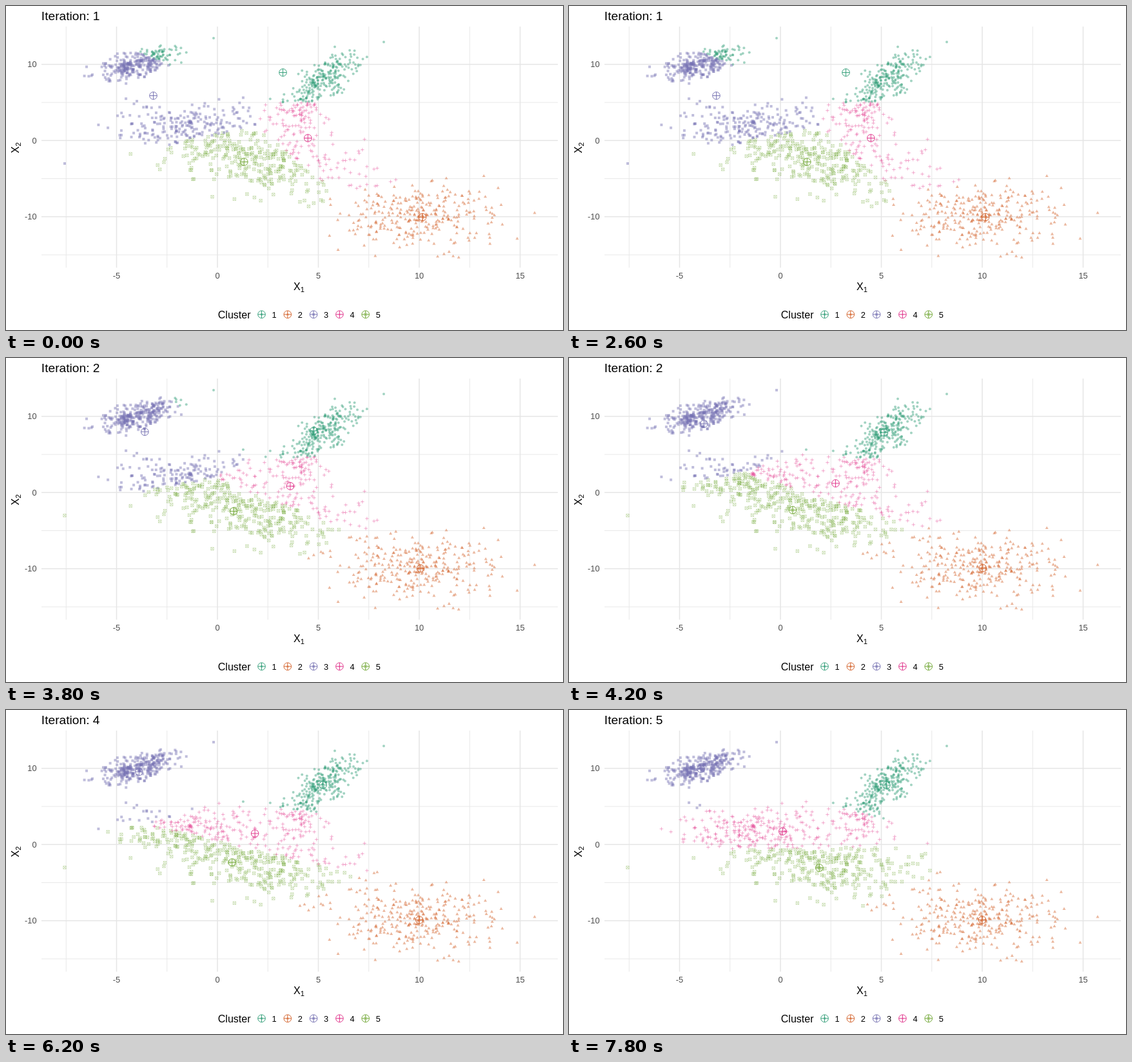
An HTML page for the animation above (8000 ms loop, 864 by 504 pixels).

```html
<!DOCTYPE html>
<html lang="en">
<head>
<meta charset="utf-8">
<title>Clustering iterations</title>
<style>
  html, body { margin: 0; width: 100%; height: 100%; overflow: hidden; background: #fff; }
  svg { display: block; width: 864px; height: 504px; font-family: "Liberation Sans", Arial, sans-serif; }
  .tick { font-size: 12.8px; fill: #4d4d4d; }
  .label { font-size: 16px; }
  .sub { font-size: 11.2px; }
  .key { font-size: 12.8px; }
  .grid path { stroke: #e6e6e6; fill: none; }
  .k0 { --c: #319d78; } .k1 { --c: #d3612a; } .k2 { --c: #7470b1; }
  .k3 { --c: #e03189; } .k4 { --c: #6da52f; }
  .dot { fill: var(--c); opacity: .45; }
  .k3.dot, .k4.dot { fill: none; stroke: var(--c); stroke-width: .75; opacity: .5; }
  .k4.dot { stroke-width: .6; }
  .mean { fill: none; stroke: var(--c); stroke-width: .95; }
</style>
</head>
<body>
<svg viewBox="0 0 864 504">
  <g class="grid" id="grid"></g>
  <g class="tick" id="ticks"></g>
  <g id="dots"></g>
  <g id="means"></g>
  <text id="title" x="54.8" y="22" font-size="19.2"></text>
  <text class="label" x="446" y="442">X<tspan class="sub" dy="3">1</tspan></text>
  <text class="label" transform="translate(20 229) rotate(-90)">X<tspan class="sub" dy="2.5">2</tspan></text>
  <text class="label" x="328.8" y="486">Cluster</text>
  <g class="key" id="legend"></g>
</svg>
<script>
const $ = id => document.getElementById(id);
const UX = 31.3, UY = 11.85;
const px = x => 328 + UX * x;
const py = y => 209.3 - UY * y;

let seed = 7321;
function random() {
  seed = seed + 0x6D2B79F5 | 0;
  let r = Math.imul(seed ^ seed >>> 15, 1 | seed);
  r = r + Math.imul(r ^ r >>> 7, 61 | r) ^ r;
  return ((r ^ r >>> 14) >>> 0) / 4294967296;
}
function normal() {
  let z;
  do z = Math.sqrt(-2 * Math.log(1 - random())) * Math.cos(2 * Math.PI * random());
  while (Math.abs(z) > 2.6);
  return z;
}

// n points around (x, y) with spreads sx, sy and correlation rho.
function blob(n, x, y, sx, sy, rho) {
  return Array.from({ length: n }, () => {
    const u = normal(), v = normal();
    return [x + sx * u, y + sy * (rho * u + Math.sqrt(1 - rho * rho) * v)];
  });
}
const points = [
  ...blob(250, 493, 116, 28, 24, -.74),
  ...blob(305, 645, 327, 58, 25, 0),
  ...blob(300, 202, 91, 32, 13.5, -.66),
  ...blob(245, 285, 187, 57, 18, 0),
  ...blob(310, 400, 244, 70, 25, .2),
  ...blob(75, 450, 172, 21, 15, 0),
  [91, 245], [322, 50], [586, 56], [820, 322]
];

// Initial guess, then where the five means stand after step k.
const GUESS = [[512, 109], [735, 351.5], [263, 191], [512, 191], [316, 225]];
const settle = (end, offset, rate, k) => end + offset * rate ** k;
const meansAt = k => [
  [settle(492.5, -63, .24, k), settle(117, -13.5, .28, k)],
  [settle(641, 5, .4, k), settle(326.5, 2, .4, k)],
  [settle(204, 24.5, .46, k), settle(90, 49.5, .5, k)],
  [468.3 - 27.4 * k, settle(186, 19.5, .68, k)],
  [369.3 - 21.2 * k + 5 * k * k, 242.5 - 5.3 * k + 1.18 * k * k]
];

function nearest([x, y], means) {
  const far = means.map(([a, b]) => Math.hypot((x - a) / UX, (y - b) / UY));
  return far.indexOf(Math.min(...far));
}

const MARKS = [
  "m-2 0a2 2 0 1 0 4 0a2 2 0 1 0-4 0z",
  "m0-2.9l2.5 4.4h-5z",
  "m-2-2h4v4h-4z",
  "m-2.8 0h5.6m-2.8-2.8v5.6",
  "m-2.2-2.2h4.4v4.4h-4.4zl4.4 4.4m0-4.4l-4.4 4.4"
];
const RING = "m-5.8 0a5.8 5.8 0 1 0 11.6 0a5.8 5.8 0 1 0-11.6 0h11.6m-5.8-5.8v11.6";
const at = ([x, y]) => `M${x.toFixed(1)} ${y.toFixed(1)}`;
const dot = (p, k) => `<path class="dot k${k}" d="${at(p)}${MARKS[k]}"/>`;
const ring = (p, k) => `<path class="mean k${k}" d="${at(p)}${RING}"/>`;

function drawFrame() {
  let lines = "", labels = "";
  const line = (d, w) => lines += `<path d="${d}" stroke-width="${w}"/>`;
  for (let x = -7.5; x <= 15; x += 2.5) {
    const major = x % 5 === 0;
    line(`M${px(x)} 32V407`, major ? 1.6 : .9);
    if (major) labels += `<text x="${px(x)}" y="424" text-anchor="middle">${x}</text>`;
  }
  for (let y = -15; y <= 10; y += 5) {
    const major = y % 10 === 0;
    line(`M55 ${py(y)}H856`, major ? 1.6 : .9);
    if (major) labels += `<text x="47.5" y="${py(y) + 4.6}" text-anchor="end">${y}</text>`;
  }
  $("grid").innerHTML = lines;
  $("ticks").innerHTML = labels;
  $("legend").innerHTML = MARKS.map((_, k) => {
    const p = [396.5 + 40.3 * k, 479.8];
    return dot(p, k) + ring(p, k) + `<text x="${p[0] + 16}" y="484.8">${k + 1}</text>`;
  }).join("");
}

const LOOP = 8000, PERIOD = 1200;
const count = (t, first) => Math.max(0, Math.floor((t - first) / PERIOD) + 1);
let shown = -1;

function render(t) {
  const step = count(t, 2800);
  if (step !== shown) {
    shown = step;
    const before = step ? meansAt(step - 1) : GUESS;
    $("dots").innerHTML = points.map(p => dot(p, nearest(p, before))).join("");
    $("means").innerHTML = meansAt(step).map(ring).join("");
  }
  $("title").textContent = "Iteration: " + (1 + count(t, 3400));
}

drawFrame();
const start = performance.now();
function tick() {
  render((performance.now() - start) % LOOP);
  requestAnimationFrame(tick);
}
tick();
</script>
</body>
</html>
```
